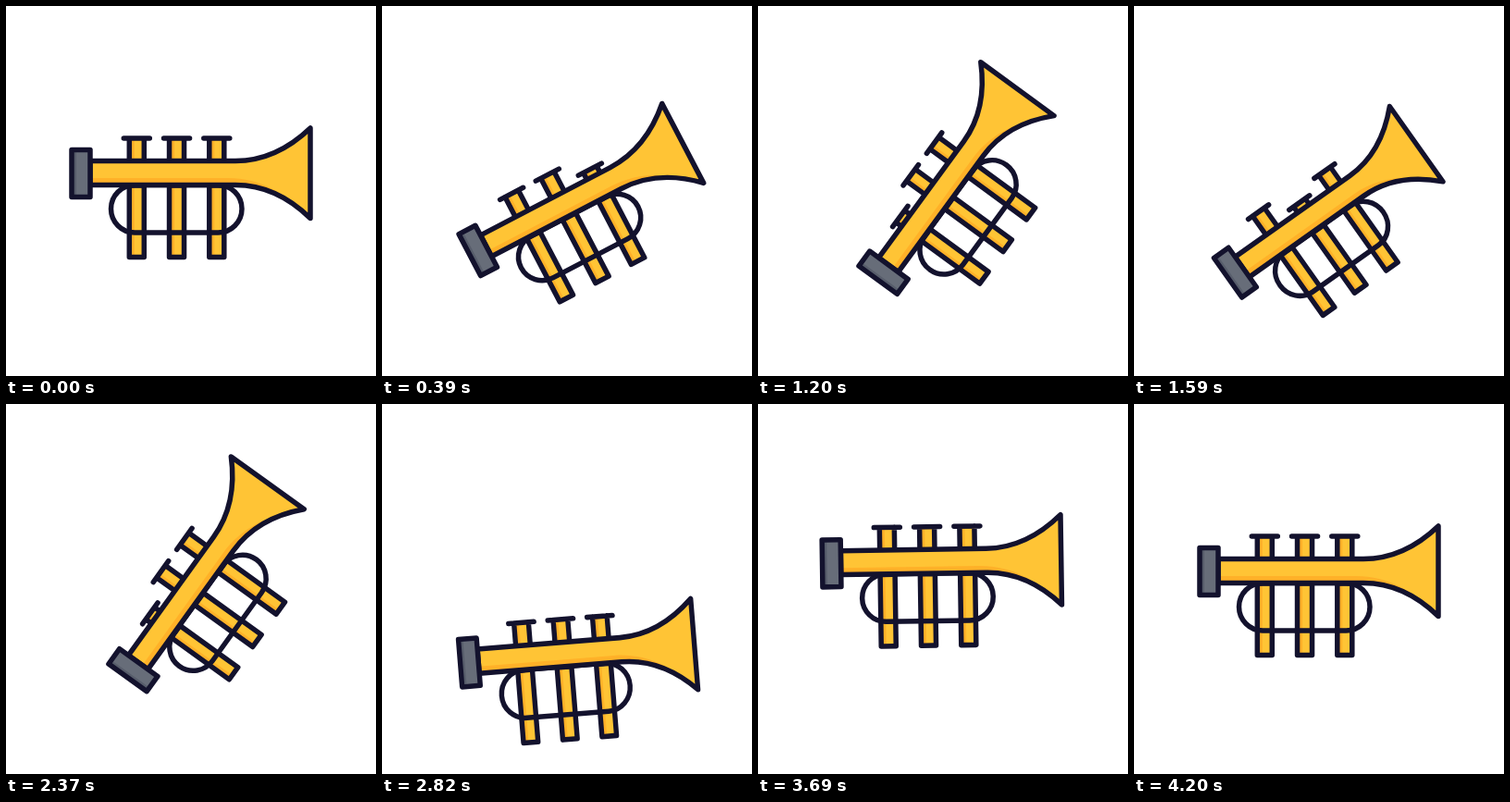
Animation of 400x400 px, one loop 4.73 s. Source, as an HTML page:

```html
<!DOCTYPE html>
<html lang="en">
<head>
<meta charset="utf-8">
<title>Trumpet</title>
<style>
  html, body { margin: 0; width: 100%; height: 100%; overflow: hidden; background: #fff; }
  svg { display: block; width: 100%; height: 100%; }
  .line { fill: none; stroke: #13122d; stroke-width: 5.5; stroke-linecap: round; stroke-linejoin: round; }
  .gold { fill: #ffc435; }
  .amber { fill: #ffb128; }
  .steel { fill: #676d79; }
  .slate { fill: #575d6b; }
</style>
</head>
<body>
<svg viewBox="0 0 400 400">
  <defs>
    <path id="horn" d="M91 167.500H248C280 167.500 307 153 329 132V229.500C307 208 280 193.500 248 193.500H91z"/>
    <g id="cap">
      <path class="gold" d="M-8 143h16v26h-16z"/>
      <path class="amber" d="M-8 143h5.500v26h-5.500z"/>
      <path class="line" d="M-8 143v26h16v-26M-14 143h28"/>
    </g>
    <g id="stem">
      <path class="gold" d="M-8 194h16v77.500h-16z"/>
      <path class="amber" d="M-8 194h5.500v77.500h-5.500z"/>
      <path class="line" d="M-8 194h16v77.500h-16z"/>
    </g>
  </defs>
  <g id="trumpet">
    <g id="valves"></g>
    <rect class="line" x="113.500" y="193.500" width="141.500" height="51.500" rx="25.700"/>
    <use class="gold" href="#horn"/>
    <path class="amber" d="M91 186H240C275 186 303 203 329 229.500C307 208 280 193.500 248 193.500H91z"/>
    <use class="line" href="#horn"/>
    <path class="steel" d="M71 155.500h20v51h-20z"/>
    <path class="slate" d="M71 155.500h5v51h-5z"/>
    <path class="line" d="M71 155.500h20v51h-20z"/>
  </g>
</svg>
<script>
const LOOP = 4730;

// Mouthpiece position, tilt and stretch along the tube.
const rest = { x: 71, y: 181, tilt: 0, stretch: 1 };
const low = { x: 101.5, y: 293.7, tilt: -35.3, stretch: 0.968 };
const high = { x: 133.5, y: 296.5, tilt: -56.3, stretch: 1 };
const dip = { x: 84.6, y: 280.2, tilt: -4.6, stretch: 0.984 };
const leap = { x: 62, y: 128, tilt: -5.3, stretch: 1.005 };

// Arrival time, pose, and extra stretch midway there.
const score = [
  [0, rest, 0],
  [560, low, 0.05],
  [1095, high, -0.014],
  [1590, low, -0.014],
  [1830, low, 0.075],
  [2310, high, 0.02],
  [2820, dip, 0.04],
  [3460, leap, 0.02],
  [3770, rest, 0],
  [LOOP, rest, 0]
];

const valves = document.getElementById('valves');
valves.innerHTML = [0, 1, 2].map(i =>
  `<g transform="translate(${141.3 + 43.25 * i})"><use class="cap" href="#cap"/><use href="#stem"/></g>`).join('');
const caps = valves.querySelectorAll('.cap');
const trumpet = document.getElementById('trumpet');

const clamp = v => Math.min(1, Math.max(0, v));
const smooth = v => v * v * (3 - 2 * v);

function poseAt(t) {
  const i = score.findIndex(([time]) => time > t);
  const [start, from] = score[i - 1], [end, to, flex] = score[i];
  const u = (t - start) / (end - start);
  const mix = k => from[k] + (to[k] - from[k]) * smooth(u);
  const landing = clamp((t - 3770) / 430);
  return {
    x: mix('x'),
    y: mix('y') + 15 * Math.sin(Math.PI * landing) * (1 - landing),
    tilt: mix('tilt'),
    stretch: mix('stretch') + flex * Math.sin(Math.PI * u) ** 2
  };
}

// Fingers run back and forth over the valves, each press overlapping the next.
function depthAt(t, valve) {
  const order = [2, 1, 0, 1];
  let depth = 0;
  for (let n = 0; n < 7; n++) {
    const age = t - 322 - 310 * n;
    if (order[n % 4] === valve) depth += 17 * smooth(clamp(Math.min(age, 420 - age) / 80));
  }
  return depth;
}

function draw(t) {
  const { x, y, tilt, stretch } = poseAt(t);
  const girth = 1 + (1 - stretch) * 0.7;
  trumpet.setAttribute('transform',
    `translate(${x} ${y}) rotate(${tilt}) scale(${stretch} ${girth}) translate(-71 -181)`);
  caps.forEach((cap, i) => cap.setAttribute('transform', `translate(0 ${depthAt(t, i)})`));
}

const begin = performance.now();
function tick() {
  draw((performance.now() - begin) % LOOP);
  requestAnimationFrame(tick);
}
tick();
</script>
</body>
</html>
```
